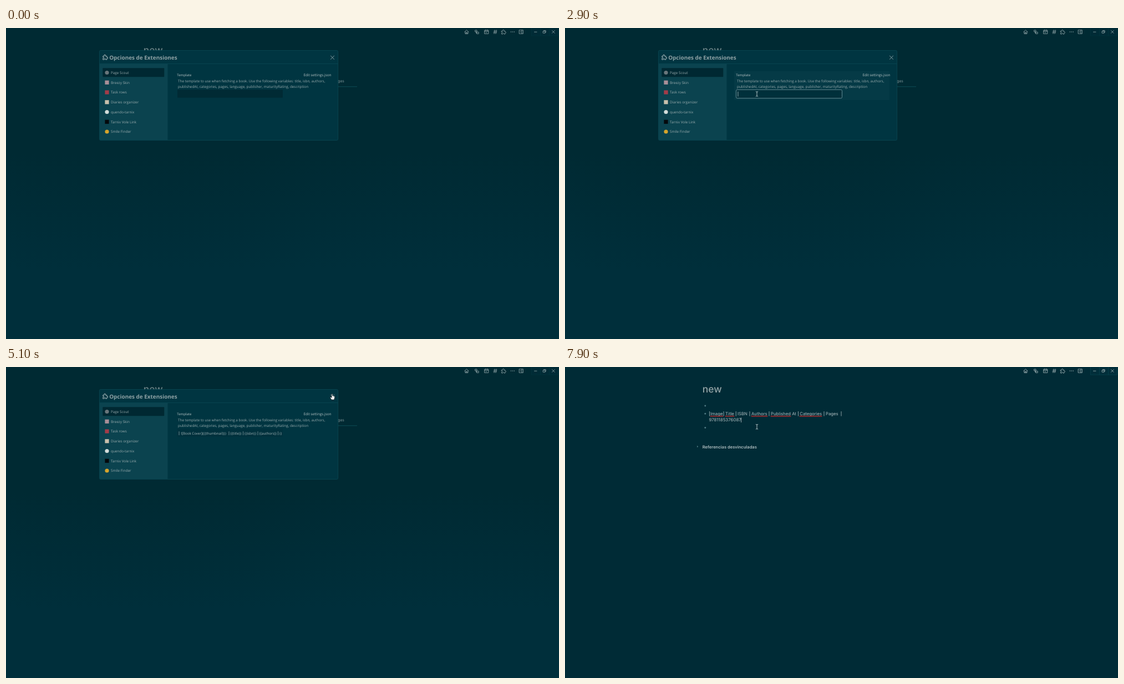
Animation, 997 px wide and 561 px high, one loop 8000 ms. Source, as an HTML page:

```html
<!DOCTYPE html>
<html lang="es">
<head>
<meta charset="utf-8">
<title>Opciones</title>
<style>
  html, body { margin: 0; width: 100%; height: 100%; overflow: hidden; background: #002b36; }
  svg { display: block; width: 100%; height: 100%; }
  text { text-rendering: geometricPrecision; white-space: pre; font-optical-sizing: none; }
  .page { font-family: Inter, "Liberation Sans", sans-serif; fill: #b0bec0; }
  .ui { font-family: "Open Sans", "Noto Sans", sans-serif; fill: #99abad; }
  .line { fill: none; stroke: #9fb0b3; stroke-width: .85; stroke-linecap: round; stroke-linejoin: round; }
</style>
</head>
<body>
<svg id="stage" viewBox="0 0 997 561">
  <defs>
    <linearGradient id="shade" x1="0" y1="0" x2="0" y2="1">
      <stop offset=".4" stop-color="#002a33"/>
      <stop offset=".78" stop-color="#002f3b"/>
    </linearGradient>
    <clipPath id="field"><rect x="310.5" y="111" width="186.5" height="15"/></clipPath>
    <path id="puzzle" d="M-3.4-1.6H-1.5C-2.3-4.5 1.5-4.5.8-1.6H2.8V.2C5-.4 5 2.8 2.8 2.3V4H.9C1.2 2-1.6 2-1.3 4H-3.4V2C-1.4 2.2-1.4-.3-3.4 0Z"/>
  </defs>
</svg>
<script>
const LOOP = 8000, STEP = 100;
const CODE = '9781185376087';
const svg = document.getElementById('stage');

function el(tag, attrs, parent = svg) {
  const node = document.createElementNS('http://www.w3.org/2000/svg', tag);
  for (const key in attrs) node.setAttribute(key, attrs[key]);
  return parent.appendChild(node);
}
const group = (parent, attrs = {}) => el('g', attrs, parent);
const rect = (p, x, y, width, height, fill, more = {}) =>
  el('rect', { x, y, width, height, fill, ...more }, p);
const path = (p, d, more = {}) => el('path', { d, class: 'line', ...more }, p);
const dot = (p, cx, cy, r, fill) => el('circle', { cx, cy, r, fill }, p);
function label(p, x, y, size, str, more = {}) {
  el('text', { x, y, 'font-size': size, ...more }, p).textContent = str;
}
function wave(p, x1, x2, y, stroke, width) {
  let d = `M${x1} ${y}`;
  for (let x = x1, up = -1; x < x2; x += 1, up = -up) d += `q.5 ${up * .7} 1 0`;
  path(p, d, { style: `stroke:${stroke};stroke-width:${width}` });
}
const show = (node, on) => { node.style.display = on ? '' : 'none'; };

// Page
rect(svg, 0, 0, 997, 561, '#002b36');
const shade = rect(svg, 0, 0, 997, 561, 'url(#shade)');
const page = group(svg, { class: 'page' });
label(page, 247.8, 46.2, 17.5, 'new', { fill: '#93a4a6', 'font-weight': 500 });
for (const y of [70, 84.2]) dot(page, 252.8, y, 1.45, '#4f7b84');

const tail = group(page);
dot(tail, 252.8, 134, 1.45, '#4f7b84');
path(tail, 'M238 166.3L240.4 168L238 169.7Z', { style: 'fill:#47757e;stroke:none' });
label(tail, 247.8, 171.2, 7.56, 'Referencias desvinculadas', { 'font-weight': 600 });

const table = group(page);
[['Image', 263], ['Title', 309], ['ISBN', 345], ['Authors', 384.3], ['Published At', 438.8],
 ['Categories', 519], ['Pages', 590.2]].forEach(([s, x]) => label(table, x, 98.4, 6.75, s));
rect(table, 260, 105.4, 373, .9, '#14606a');
label(table, 259.4, 122.8, 7.9, CODE);

const editor = group(page);
[['Image', 262], ['Title', 289], ['ISBN', 311], ['Authors', 336], ['Published At', 371],
 ['Categories', 423.3], ['Pages', 470]].forEach(([s, x]) => label(editor, x, 86.8, 7.75, s));
for (const x of [260.6, 286, 308.2, 333, 368, 420.4, 467, 498]) rect(editor, x - .4, 80, .8, 8.6, '#b0bec0');
label(editor, 259.4, 98.4, 7.9, CODE);
const editMarks = group(editor);
[[262, 285], [289, 305], [336, 365], [371, 407], [423, 463]]
  .forEach(([a, b]) => wave(editMarks, a, b, 88.7, '#d22c2c', 1.1));
rect(editMarks, 317.3, 91.4, .8, 8.6, '#c3d0d2');

// Toolbar
const bar = group(svg);
const buttons = group(bar);
for (const x of [947.5, 963.5, 979.5])
  rect(buttons, x, -.5, 16, 14.5, '#002e3a', { stroke: '#08424d', 'stroke-width': .7 });
path(bar, 'M826.8 7L830.4 3.6L834 7M827.8 6.4V10.4H833V6.4M829.5 10.4V7.8H831.3V10.4');
path(bar, 'M846 4H849V6.6H846ZM849 7.4H852.2V10.4H849ZM847.4 6.6V9H849');
path(bar, 'M863 4.2H869.8V10.4H863ZM863 6.2H869.8M864.8 3.2V4.8M868 3.2V4.8M865 8.3H866.4');
path(bar, 'M881.3 3.6L880 10.4M884.2 3.6L882.9 10.4M879.4 5.8H885M878.9 8.3H884.5');
el('use', { href: '#puzzle', class: 'line', transform: 'translate(897 7)' }, bar);
for (const x of [910.5, 913.4, 916.3]) dot(bar, x, 7, .8, '#9fb0b3');
path(bar, 'M925.5 3.8H932.4V10.3H925.5ZM930 3.8V10.3M926.9 7H928.7');
path(bar, 'M952.5 7.2H957M968.5 5.8H972V9.2H968.5ZM969.6 5.6V4.6H973.2V8H972.2M984.5 4.6L989.2 9.3M989.2 4.6L984.5 9.3');

// Dialog
const dialog = group(svg, { class: 'ui' });
rect(dialog, 168.5, 40.5, 430, 162, '#003541', { rx: 2, stroke: '#0b4854', 'stroke-width': .8 });
rect(dialog, 169, 65, 122.5, 137, '#0b434f');
rect(dialog, 169, 64.2, 429, .8, '#0b4854');
el('use', { href: '#puzzle', class: 'line', style: 'stroke-width:.9', transform: 'translate(178.6 52.6) scale(1.12)' }, dialog);
label(dialog, 186.2, 56.8, 9.93, 'Opciones de Extensiones', { 'font-weight': 700, fill: '#8fa2a5' });
path(dialog, 'M585.4 50.2L591.6 56.4M591.6 50.2L585.4 56.4');

rect(dialog, 174.3, 72.3, 111, 16, '#002832', { rx: 1 });
[['Page Scout', '#69767b', 1], ['Breezy Skin', '#a98f98', 0], ['Task rows', '#a43c49', 0],
 ['Diaries organizer', '#c9c0ac', 0], ['quendo-tarnix', '#d3dcda', 1],
 ['Tarnix Vole Link', '#04090c', 0], ['Smile Finder', '#d6a42c', 1]].forEach(([name, tint, round], i) => {
  const y = 80.5 + i * 17.75;
  if (round) dot(dialog, 182, y, 3.6, tint);
  else rect(dialog, 178.4, y - 3.6, 7.2, 7.2, tint);
  label(dialog, 189, y + 2.4, 6.37, name);
});

const hover = rect(dialog, 305, 77.5, 280, 52.5, '#053a46', { rx: 1 });
label(dialog, 308.3, 87, 6.05, 'Template', { fill: '#b8c4c5' });
label(dialog, 536.4, 87, 6.35, 'Edit settings.json', { fill: '#b8c4c5' });
label(dialog, 310, 98, 6.365, 'The template to use when fetching a book. Use the following variables: title, isbn, authors,');
label(dialog, 310, 107.9, 6.365, 'publishedAt, categories, pages, language, publisher, maturityRating, description');

const box = rect(dialog, 309, 111.2, 190, 14.6, '#002a34', { rx: 1 });
const ring = rect(dialog, 308.5, 111.3, 191, 15.4, '#00303b', { rx: 2, stroke: '#6f929a', 'stroke-width': .9 });
const field = group(dialog, { 'clip-path': 'url(#field)' });

function values(words, bars) {
  const g = group(field, { fill: '#a9b7b9' });
  for (const [s, x] of words) label(g, x, 121.6, 6.2, s);
  for (const x of bars) rect(g, x - .3, 116.2, .65, 6.8, '#a9b7b9');
  return g;
}
const head = values([['![Book Cover]({{thumbnail}})', 315.3], ['{{title}}', 404.3], ['{{isbn}}', 429.8],
  ['{{authors}}', 456.4], ['{{publishedAt}}', 492.8]], [312, 402, 427.5, 454, 490.5]);
const scrolled = values([['{{isbn}}', 307], ['{{authors}}', 333.8], ['{{publishedAt}}', 370.8],
  ['{{categories}}', 421.3], ['{{pages}}', 466.5]], [331.5, 368.5, 419, 464, 495.6]);
const marks = group(scrolled);
[[312, 324], [338, 361], [375, 412], [426, 457], [471, 489]]
  .forEach(([a, b]) => wave(marks, a, b, 122.9, '#b03a41', .7));
const caret = rect(field, 0, 114.6, .7, 9, '#d0dadb');

// Pointers, each drawn from its hot spot
const pointers = {
  arrow: group(svg),
  hand: group(svg),
  beam: group(svg)
};
const skin = 'fill:#fff;stroke:#0a1518;stroke-width:.6';
path(pointers.arrow, 'M0 0V8.4L1.9 6.7L3.2 9.6L4.7 8.9L3.4 6.1H6Z', { style: skin });
path(pointers.hand, 'M-.9.6Q0-.5.8.6V3.6L3.6 4.2Q4.8 4.6 4.6 6.2L3.7 10.6H-1L-3.3 7Q-3.3 5.4-1.9 6L-.9 7Z', { style: skin });
path(pointers.beam, 'M-1.7-4.3Q0-4.3 0-3.4Q0-4.3 1.7-4.3M0-3.4V3.4M-1.7 4.3Q0 4.3 0 3.4Q0 4.3 1.7 4.3',
  { style: 'stroke:#dfe6e6;stroke-width:.8' });

const track = [
  [2200, 518.5, 479.5, 'arrow'], [2300, 430, 250, 'arrow'], [2400, 352, 116, 'beam'],
  [2600, 352, 113, 'beam'], [2900, 346, 119, 'beam'], [3400, 346, 119, 'beam'],
  [3500, 347, 121, 'beam'], [3600, 349.5, 126.6, 'arrow'], [3700, 360, 140, 'arrow'],
  [3900, 378.6, 152.8, 'arrow'], [4200, 378.6, 152.8, 'arrow'], [4300, 390, 158, 'arrow'],
  [4400, 412, 160.5, 'arrow'], [4600, 490, 125, 'arrow'], [4800, 560, 74, 'arrow'],
  [4900, 580, 56, 'arrow'], [5000, 588, 48.4, 'hand'], [6600, 588, 48.4, 'hand'],
  [6700, 582, 55, 'arrow'], [6900, 510, 84, 'arrow'], [7100, 400, 114, 'arrow'],
  [7300, 347, 123, 'beam'], [7800, 347, 123, 'beam'], [7900, 346, 107.8, 'beam']
];

function placePointer(t) {
  const i = track.findLastIndex(k => k[0] <= t);
  const now = track[i], next = track[i + 1] || now;
  for (const kind in pointers) show(pointers[kind], now && now[3] === kind);
  if (!now) return;
  // The last leg is a jump, not a glide
  const f = next === now || now[0] === 7300 ? 0 : (t - now[0]) / (next[0] - now[0]);
  const x = now[1] + (next[1] - now[1]) * f, y = now[2] + (next[2] - now[2]) * f;
  pointers[now[3]].setAttribute('transform', `translate(${x} ${y})`);
}

function render(t) {
  const within = (a, b) => t >= a && t < b;
  const open = t < 6600, editing = t >= 7500, focused = within(2600, 3900);
  show(shade, open);
  show(dialog, open);
  page.style.opacity = open ? .7 : 1;
  bar.style.opacity = open ? .9 : 1;
  buttons.style.opacity = open ? .5 : 1;
  show(table, !editing);
  show(editor, editing);
  show(editMarks, t >= 7600);
  tail.setAttribute('transform', `translate(0 ${editing ? -24.5 : 0})`);

  show(hover, within(2400, 3700));
  show(ring, focused);
  ring.style.opacity = Math.min(1, (t - 2500) / 400);
  box.setAttribute('fill', t < 3200 ? '#002a34' : '#00313d');
  show(scrolled, within(3200, 3900));
  show(marks, t >= 3300);
  show(head, t >= 3900);
  show(caret, focused);
  caret.setAttribute('x', t < 3200 ? 311.6 : 495.4);
  placePointer(t);
}

function frame() {
  const t = performance.now() % LOOP;
  render(Math.floor(t / STEP) * STEP);
  requestAnimationFrame(frame);
}
frame();
</script>
</body>
</html>
```
